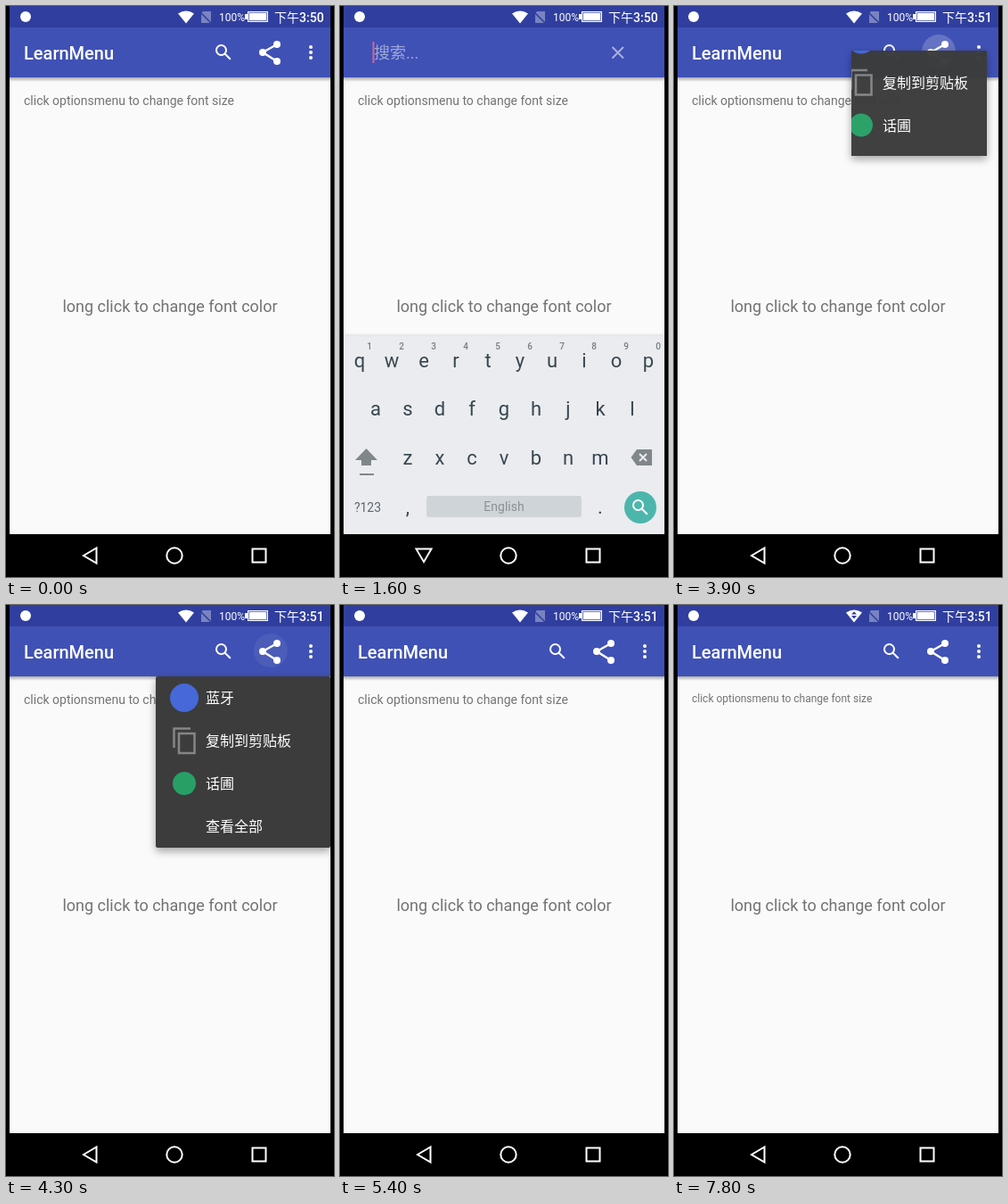
An HTML page for the animation above (8000 ms loop, 368 by 640 pixels).

```html
<!DOCTYPE html>
<html lang="zh">
<head>
<meta charset="utf-8">
<title>Menu demo</title>
<style>
html, body { margin: 0; width: 100%; height: 100%; overflow: hidden; background: #000; }
.layer, .popup { position: absolute; left: 0; top: 0; width: 368px; height: 640px; }
text { font-family: Roboto, "Noto Sans CJK SC", "Noto Sans CJK", sans-serif; }
.mid { text-anchor: middle; }
.line { fill: none; stroke: #fff; stroke-width: 2; }
.popup { filter: drop-shadow(0 4px 5px rgba(0,0,0,.35)); }

/* Every state change is a hard cut on a 100 ms grid: 1.25% per step. */
.anim { animation: 8s step-end infinite; }
.hidden { opacity: 0; }

#actions { animation-name: actions; }
@keyframes actions { 15% { opacity: 0 } 35% { opacity: 1 } }
#field { animation-name: field; }
@keyframes field { 15% { opacity: .6 } 16.25% { opacity: 1 } 35% { opacity: 0 } }
#cursor { animation-name: cursor; }
@keyframes cursor { 27.5% { opacity: 0 } 35% { opacity: .6 } }

#keyboard { transform: translateY(40px); animation-name: keyboard; }
@keyframes keyboard {
  18.75% { opacity: .6; transform: translateY(24px) }
  20% { opacity: 1; transform: none }
  30% { opacity: .8; transform: translateY(10px) }
  31.25% { opacity: .35; transform: translateY(28px) }
  32.5% { opacity: 0; transform: translateY(40px) }
}
#back { transform-origin: 94px 616px; animation-name: back; }
@keyframes back { 16.25% { transform: rotate(-90deg) } 31.25% { transform: none } }

#before { animation-name: before; }
@keyframes before { 32.5% { opacity: 0 } }
#after { animation-name: after; }
@keyframes after { 32.5% { opacity: 1 } }
#traffic { animation-name: traffic; }
@keyframes traffic { 42.5% { opacity: 1 } 43.75% { opacity: 0 } 80% { opacity: 1 } }
#hint { font-size: 14px; animation-name: hint; }
@keyframes hint { 95% { font-size: 12px; transform: translateY(-2px) } }

#press { animation-name: press; }
@keyframes press {
  46.25% { opacity: .12 } 48.75% { opacity: .2 } 52.5% { opacity: .14 }
  53.75% { opacity: .07 } 55% { opacity: 0 }
}
#share { animation-name: share; }
@keyframes share {
  47.5% { opacity: .8 } 48.75% { opacity: .98 } 50% { opacity: 1 }
  60% { opacity: .98 } 61.25% { opacity: .93 } 62.5% { opacity: .6 }
  63.75% { opacity: .25 } 65% { opacity: 0 }
}
#shareClip { clip-path: inset(80px 4px 368px 168px round 2px); animation-name: shareClip; }
@keyframes shareClip {
  47.5% { clip-path: inset(45px 38px 550px 235px) }
  48.75% { clip-path: inset(50px 17px 472px 199px) }
  50% { clip-path: inset(64px 9px 418px 181px) }
  51.25% { clip-path: inset(76px 5px 380px 170px) }
  52.5% { clip-path: inset(80px 4px 368px 168px round 2px) }
}
#shareList { animation-name: shareList; }
@keyframes shareList {
  47.5% { transform: translate(18px,-100px) }
  48.75% { transform: translate(10px,-66.5px) }
  50% { transform: translate(4px,-30px) }
  51.25% { transform: translate(1px,-7px) }
  52.5% { transform: none }
}

#sizes { animation-name: sizes; }
@keyframes sizes {
  73.75% { opacity: .8 } 75% { opacity: 1 }
  95% { opacity: .8 } 96.25% { opacity: .35 } 97.5% { opacity: 0 }
}
#sizesClip { clip-path: inset(28px 8px 372px 164px round 2px); animation-name: sizesClip; }
@keyframes sizesClip {
  73.75% { clip-path: inset(36px 16px 545px 262px) }
  75% { clip-path: inset(28px 11px 485px 200px) }
  76.25% { clip-path: inset(28px 9px 420px 173px) }
  77.5% { clip-path: inset(28px 8px 372px 164px round 2px) }
}
#sizesList { animation-name: sizesList; }
@keyframes sizesList {
  73.75% { transform: translate(42px,-75px) }
  75% { transform: translate(22px,-52px) }
  76.25% { transform: translate(6px,-20px) }
  77.5% { transform: none }
}
#choice { animation-name: choice; }
@keyframes choice { 92.5% { opacity: .07 } 93.75% { opacity: .14 } }
</style>
</head>
<body>
<svg class="layer" viewBox="0 0 368 640">
  <defs>
    <linearGradient id="shade" x2="0" y2="1">
      <stop stop-opacity=".32"/><stop offset="1" stop-opacity="0"/>
    </linearGradient>
    <g id="glass" class="line"><circle cx="9.5" cy="9.5" r="5.5"/><path d="M13.5 13.5L19.8 19.8"/></g>
  </defs>
  <path fill="#fafafa" d="M4 80H364V592H4z"/>
  <path fill="url(#shade)" d="M4 80H364V85H4z"/>
  <path fill="#3f51b5" d="M4 24H364V80H4z"/>
  <path fill="#303f9f" d="M4 0H364V24H4z"/>

  <g fill="#fff">
    <circle cx="22" cy="12" r="6"/>
    <path d="M202 19.5L193 8.6Q202 2.4 211 8.6z"/>
    <path id="traffic" class="anim hidden" fill="#303f9f" d="M202 7.2L205 10.6H199zM202 15.4L199 12H205z"/>
    <path fill="#7983c0" d="M219 8L221 6H230V19H219z"/>
    <path stroke="#303f9f" stroke-width="1.6" d="M217.5 6.5L231 20"/>
    <text x="239" y="17" font-size="12">100%</text>
    <path d="M268 9H271V6H294V18H271V15H268z"/>
    <path fill="none" stroke="#303f9f" stroke-width=".7" d="M272.5 7.5H292.5V16.5H272.5z"/>
    <g font-size="14" font-weight="500">
      <text id="before" class="anim" x="301" y="18">下午3:50</text>
      <text id="after" class="anim hidden" x="301" y="18">下午3:51</text>
    </g>
  </g>

  <g id="actions" class="anim" fill="#fff">
    <text x="20" y="60" font-size="20" font-weight="500">LearnMenu</text>
    <use href="#glass" x="232" y="40"/>
    <circle id="press" class="anim hidden" cx="297" cy="51" r="19"/>
    <path class="line" style="stroke-width:2.4" d="M304 43L288 52L304 62"/>
    <circle cx="304" cy="43" r="4"/><circle cx="288" cy="52" r="4"/><circle cx="304" cy="62" r="4"/>
    <circle cx="342" cy="46" r="2"/><circle cx="342" cy="52" r="2"/><circle cx="342" cy="58" r="2"/>
  </g>
  <g id="field" class="anim hidden">
    <text x="38" y="59" font-size="18" fill="#fff" fill-opacity=".5">搜索...</text>
    <path id="cursor" class="anim" opacity=".75" fill="#ff6f91" d="M36.5 40H38.5V64H36.5z"/>
    <path class="line" stroke-opacity=".55" d="M305.5 46L318 58.5M318 46L305.5 58.5"/>
  </g>

  <g fill="#737373">
    <text id="hint" class="anim" x="20" y="111">click optionsmenu to change font size</text>
    <text class="mid" x="184" y="343" font-size="18">long click to change font color</text>
  </g>

  <g id="keyboard" class="anim hidden">
    <path fill="#ebecf0" d="M4 369H364V592H4z"/>
    <path fill="#000" fill-opacity=".04" d="M4 367H364V370H4z"/>
    <g id="keys" class="mid" fill="#37474f"></g>
    <path fill="#80878b" d="M29.5 496L42 509H35V515H24V509H17zM22 524H38V526H22z"/>
    <path fill="#80878b" d="M333 497H350V515H333L326.5 506z"/>
    <path class="line" style="stroke:#ebecf0" d="M336 502L344 510M344 502L336 510"/>
    <rect x="97" y="549" width="174" height="24" rx="3" fill="#cfd4d8"/>
    <text class="mid" x="184" y="566" font-size="14" fill="#8a9094">English</text>
    <circle cx="337" cy="562" r="18" fill="#4db6ac"/>
    <use href="#glass" x="325" y="550"/>
  </g>

  <path d="M0 592H368V640H0z"/>
  <g class="line">
    <path id="back" class="anim" d="M87 616L101.500 607.500V624.500z"/>
    <circle cx="189" cy="616" r="8.7"/>
    <path d="M276.500 608.500H291.500V623.500H276.500z"/>
  </g>
</svg>

<div id="share" class="popup anim hidden">
  <svg id="shareClip" class="layer anim" viewBox="0 0 368 640">
    <path fill="#3c3c3c" d="M0 0H368V640H0z"/>
    <g id="shareList" class="anim" fill="#fff" font-size="16">
      <circle cx="200" cy="104" r="16" fill="#4668d8"/>
      <path class="line" style="stroke:#858585;stroke-width:2.500" d="M188.500 160V138.500H207M194 144H211.500V166H194z"/>
      <circle cx="200" cy="200" r="13" fill="#27a066"/>
    </g>
  </svg>
</div>

<div id="sizes" class="popup anim hidden">
  <svg id="sizesClip" class="layer anim" viewBox="0 0 368 640">
    <path fill="#fafafa" d="M0 0H368V640H0z"/>
    <path id="choice" class="anim hidden" d="M164 28H360V76H164z"/>
    <g id="sizesList" class="anim" fill="#1c1c1c" font-size="16"></g>
  </svg>
</div>

<script>
function label(parent, text, x, y, attrs = {}) {
  const node = document.createElementNS("http://www.w3.org/2000/svg", "text");
  Object.entries({ x, y, ...attrs }).forEach(([key, value]) => node.setAttribute(key, value));
  node.textContent = text;
  document.getElementById(parent).append(node);
}

function keyRow(chars, x, y, attrs = { "font-size": 22 }) {
  [...chars].forEach((char, i) => label("keys", char, x + 36 * i, y, attrs));
}

function menu(parent, items, x, y) {
  items.forEach((item, i) => label(parent, item, x, y + 48 * i));
}

keyRow("qwertyuiop", 22, 405);
keyRow("1234567890", 33, 385, { "font-size": 10, "font-weight": 500, fill: "#777d80" });
keyRow("asdfghjkl", 40, 459);
keyRow("zxcvbnm", 76, 514);
keyRow(",", 76, 569);
keyRow(".", 292, 569);
label("keys", "?123", 31, 567, { "font-size": 14, fill: "#5b666c" });

menu("shareList", ["蓝牙", "复制到剪贴板", "话圃", "查看全部"], 224, 110);
menu("sizesList", ["12sp", "14sp", "16sp", "18sp", "22sp"], 180, 58);
</script>
</body>
</html>
```
